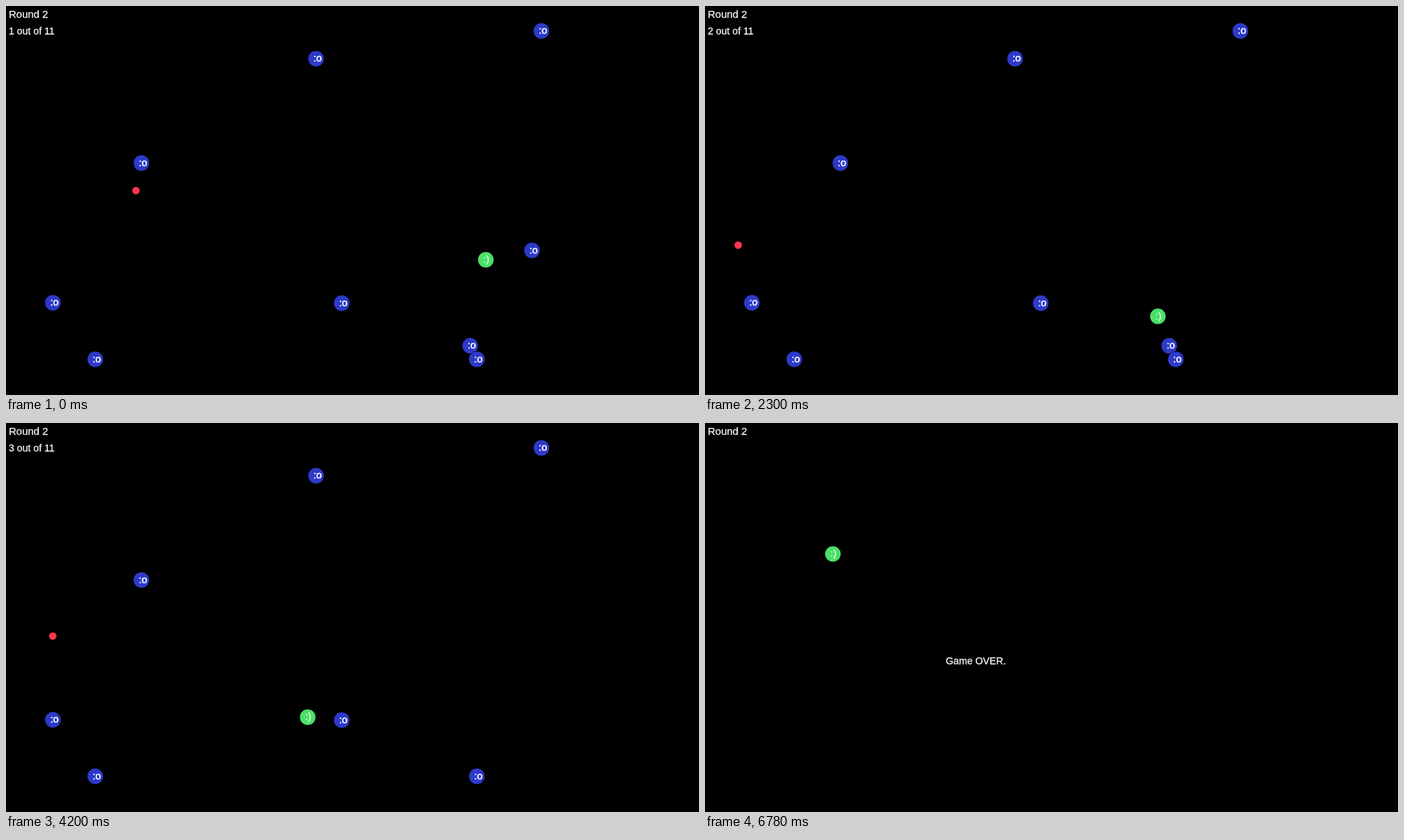
These frames come from a looping animation (998x561 px, 6800 ms). An HTML page with a canvas:

```html
<!DOCTYPE html>
<html lang="en">
<head>
<meta charset="utf-8">
<title>Dot chase</title>
<style>
html, body { margin: 0; width: 100%; height: 100%; overflow: hidden; background: #000; }
canvas { display: block; }
</style>
</head>
<body>
<canvas id="stage" width="998" height="561"></canvas>
<script>
const ctx = document.getElementById('stage').getContext('2d');
const LOOP = 6800, GAME_OVER = 6030, BURST_LIFE = 1150;
const BLUE = '#2d3ac8', GREEN = '#4ae168', RED = '#fa3650';

// x, y, time eaten
const blues = [
  [195, 226.5], [446.5, 76], [771, 36], [757.5, 352.5, 800], [67.5, 428],
  [128.5, 509.5], [483.5, 428.5], [668.5, 490, 2490], [678, 509.5]
];

// velocities of the burst pieces, px per second
const shards = [[-47, -8], [-18, 15], [-9, 12], [14, 4], [28, -5]];

// the player moves at one speed per axis while a key is held: [press, release]
const PLAYER_SPEED = 0.1475;
const keys = {
  right: [[460, 800]],
  left: [[1172, 1775], [2725, 5898]],
  up: [[950, 1164], [2540, 2581], [3899, 5797]],
  down: [[1534, 2486]]
};

function held(key, t) {
  return keys[key].reduce((sum, [a, b]) => sum + Math.max(0, Math.min(t, b) - a), 0);
}

function player(t) {
  return [
    691 + PLAYER_SPEED * (held('right', t) - held('left', t)),
    366 + PLAYER_SPEED * (held('down', t) - held('up', t))
  ];
}

// folds a straight run into bounces between 0 and size
function bounce(pos, size) {
  const p = Math.abs(pos) % (2 * size);
  return p > size ? 2 * size - p : p;
}

function enemy(t) {
  return [bounce(187.2 - 0.0606 * t, 998), bounce(266.5 - 0.2657 * t, 578.5)];
}

function disc(x, y, r, color) {
  ctx.fillStyle = color;
  ctx.beginPath();
  ctx.arc(x, y, r, 0, Math.PI * 2);
  ctx.fill();
}

function label(text, x, y, size, weight = 0.25) {
  ctx.font = size + 'px "Liberation Sans", Arial, sans-serif';
  ctx.fillStyle = ctx.strokeStyle = '#fff';
  ctx.lineWidth = weight;
  ctx.fillText(text, x, y);
  ctx.strokeText(text, x, y);
}

function face(x, y, color, text, weight) {
  disc(x, y, 11.8, '#000');
  disc(x, y, 11.2, color);
  label(text, x - 3.7, y + 4, 14.5, weight);
}

function burst(x, y, age) {
  if (age >= BURST_LIFE) return;
  ctx.globalAlpha = 1 - age / BURST_LIFE;
  for (const [vx, vy] of shards) disc(x + vx * age / 1000, y + vy * age / 1000, 2.4, BLUE);
  ctx.globalAlpha = 1;
}

function draw(t) {
  ctx.fillStyle = '#000';
  ctx.fillRect(0, 0, 998, 561);

  if (t < GAME_OVER) {
    let score = 1;
    for (const [x, y, eaten = Infinity] of blues) {
      if (t < eaten) face(x, y, BLUE, ':o', 0.5);
      else {
        score++;
        burst(x, y, t - eaten);
      }
    }
    disc(...enemy(t), 5.4, RED);
    label(score + ' out of 11', 4, 40.5, 14.2);
  } else {
    label('Game OVER.', 346.7, 347.5, 14.2);
  }
  face(...player(t), GREEN, ':)', 0.1);
  label('Round 2', 4, 17, 15);
}

const start = performance.now();
function tick() {
  draw((performance.now() - start) % LOOP);
  requestAnimationFrame(tick);
}
tick();
</script>
</body>
</html>
```
